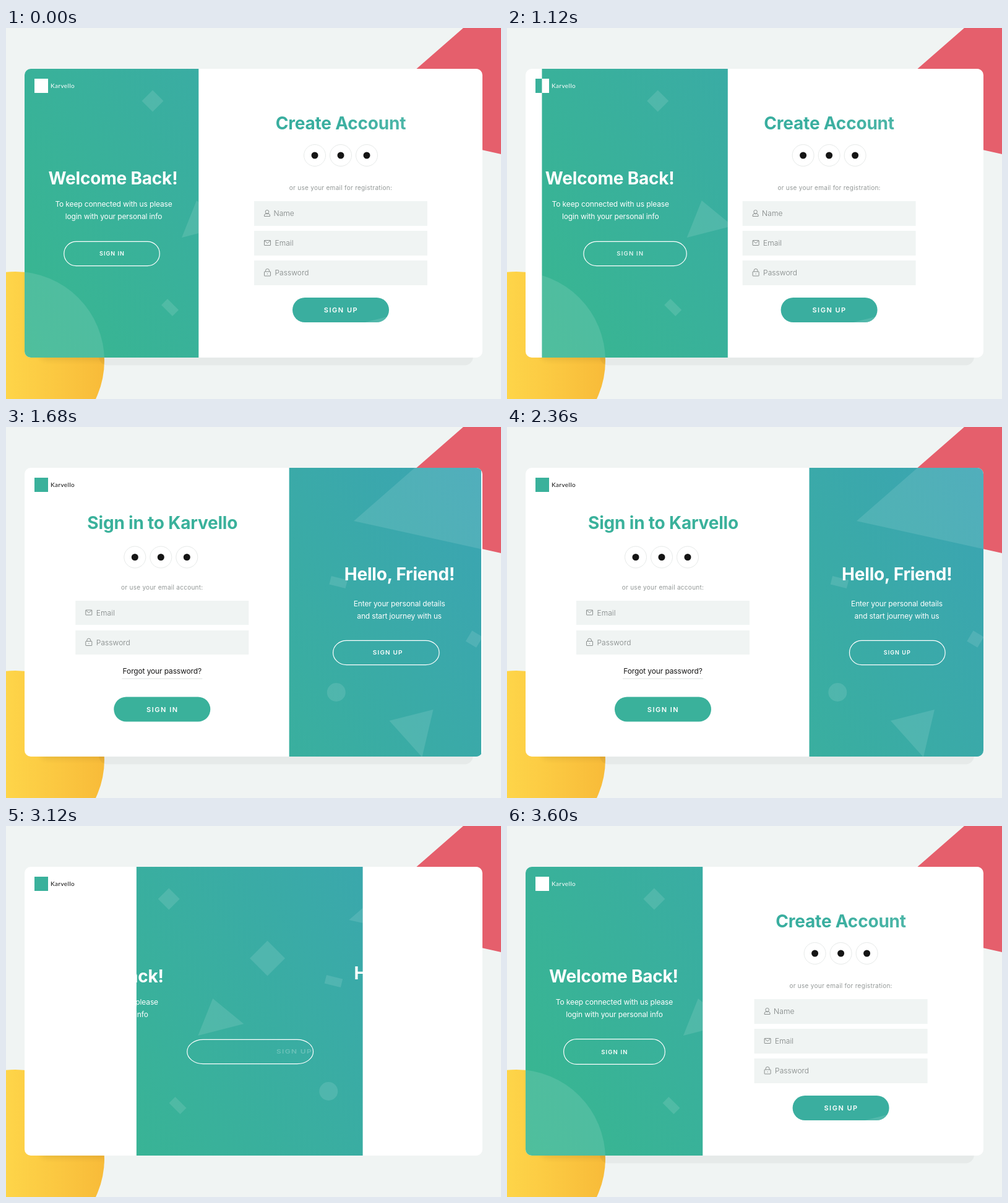
An HTML page that plays this animation: 800 px wide and 600 px high, repeating every 3.64 s.

```html
<!DOCTYPE html>
<html lang="en">
<head>
<meta charset="utf-8">
<title>Sign in / sign up</title>
<style>
html, body { margin: 0; width: 100%; height: 100%; overflow: hidden; background: #f0f4f3; }
svg { display: block; width: 800px; height: 600px; font-family: Inter, "Open Sans", sans-serif; }
text { white-space: pre; }
.title { font-size: 28px; font-weight: 700; letter-spacing: -.2px; text-anchor: middle; }
.body { font-size: 12px; letter-spacing: -.13px; text-anchor: middle; }
.hint { font-size: 10px; letter-spacing: .28px; fill: #939897; text-anchor: middle; }
.label { font-size: 12px; font-weight: 300; letter-spacing: .05px; fill: #7c8180; }
.cta { font-size: 11px; font-weight: 600; letter-spacing: 1.5px; fill: #fff; text-anchor: middle; }
.ghost { font-size: 9px; font-weight: 600; letter-spacing: 1.05px; fill: #fff; text-anchor: middle; }
.brand { font: 10px Lato, sans-serif; letter-spacing: .4px; }
.icon { fill: none; stroke: #8a8f8e; stroke-width: 1; }
</style>
</head>
<body>
<svg viewBox="0 0 800 600">
  <defs>
    <linearGradient id="sea" gradientUnits="userSpaceOnUse" x1="30" y1="533" x2="770" y2="66">
      <stop stop-color="#38b78f"/><stop offset="1" stop-color="#3ba4b3"/>
    </linearGradient>
    <linearGradient id="sun" gradientUnits="userSpaceOnUse" x1="0" y1="0" x2="159" y2="0">
      <stop stop-color="#fed549"/><stop offset="1" stop-color="#f8bb39"/>
    </linearGradient>
    <linearGradient id="heading"><stop offset=".4" stop-color="#39ae9f"/><stop offset="1" stop-color="#4db6a8"/></linearGradient>
    <filter id="soft" x="-10%" y="-50%" width="120%" height="200%"><feGaussianBlur stdDeviation="5"/></filter>
    <clipPath id="card"><rect x="30" y="66" width="740" height="467" rx="10"/></clipPath>
    <clipPath id="window"><rect id="windowRect" y="66" height="467"/></clipPath>
    <clipPath id="sunClip"><circle cx="15" cy="538" r="144"/></clipPath>
  </defs>

  <rect width="800" height="600" fill="#f0f4f3"/>
  <circle cx="15" cy="538" r="144" fill="url(#sun)"/>
  <path d="M739 0H800V204L565 152Z" fill="#e55f6c"/>
  <g clip-path="url(#sunClip)">
    <rect x="55" y="490" width="690" height="47" rx="10" opacity=".08" filter="url(#soft)"/>
  </g>
  <rect id="shadow" x="150" y="500" width="605" height="45.5" rx="14" opacity=".045"/>
  <rect x="30" y="66" width="740" height="467" rx="10" fill="#fff"/>

  <g clip-path="url(#card)">
    <rect x="46" y="82" width="22" height="23" fill="#3ab19b"/>
    <text class="brand" x="72" y="97" fill="#111">Karvello</text>
    <g id="signUpForm"></g>
    <g id="signInForm"></g>
    <g clip-path="url(#window)">
      <rect x="30" y="66" width="740" height="467" fill="url(#sea)"/>
      <g id="shapes" fill="#fff" fill-opacity=".115"></g>
      <rect x="46" y="82" width="22" height="23" fill="#fff"/>
      <text class="brand" x="72" y="97" fill="#fff">Karvello</text>
    </g>
    <g id="welcome" fill="#fff">
      <text class="title" x="173" y="253">Welcome Back!</text>
      <text class="body" x="174" y="289">To keep connected with us please</text>
      <text class="body" x="174" y="309">login with your personal info</text>
    </g>
    <g id="hello" fill="#fff">
      <text class="title" x="630.3" y="248">Hello, Friend!</text>
      <text class="body" x="630" y="290">Enter your personal details</text>
      <text class="body" x="630" y="310">and start journey with us</text>
    </g>
    <g id="button">
      <rect x="-77.3" y="-19.6" width="154.6" height="39.2" rx="19.6" fill="none" stroke="#fff" stroke-width="1.2" vector-effect="non-scaling-stroke"/>
      <text id="inText" class="ghost" y="3.4">SIGN IN</text>
      <text id="upText" class="ghost" y="3.4">SIGN UP</text>
    </g>
  </g>
</svg>
<script>
const LOOP = 3640, STEP = 40, RETURN = 1791;
const $ = id => document.getElementById(id);
const mix = (a, b, k) => a + (b - a) * k;
const ramp = (x, a, b) => Math.min(1, Math.max(0, (x - a) / (b - a)));
const smooth = (x, a, b) => { const k = ramp(x, a, b); return k * k * (3 - 2 * k); };

const icons = {
  Name: '<circle cx="5" cy="3.3" r="2.8"/><path d="M.5 10.5V9Q.8 6.5 3 6.3Q5 7.3 7 6.3Q9.3 6.5 9.5 9V10.5Z"/>',
  Email: '<rect x=".5" y="1.5" width="10" height="8" rx=".5"/><path d="M.8 2L5.5 6L10.2 2"/>',
  Password: '<rect x=".5" y="4" width="10" height="7" rx=".5"/><path d="M2.5 4V2.5Q2.5 -.5 5.5 -.5T8.5 2.5V4M5.5 7V8.3"/>'
};

function field(name, x, y, h) {
  const mid = y + h / 2, textX = x + (name === 'Name' ? 31.5 : 33.5);
  return `<rect x="${x}" y="${y}" width="280" height="${h}" fill="#f0f4f3"/>
    <g class="icon" transform="translate(${x + 16} ${mid - 6})">${icons[name]}</g>
    <text class="label" x="${textX}" y="${mid + 4.2}">${name}</text>`;
}

const socials = (x, y) => [-42, 0, 42].map(dx =>
  `<circle cx="${x + dx}" cy="${y}" r="17.5" fill="#fff" stroke="#e6e9e8"/>
   <circle cx="${x + dx}" cy="${y}" r="5.5" fill="#151515"/>`).join('');

const cta = (label, x, y, fill) =>
  `<rect x="${x - 78}" y="${y}" width="156" height="40" rx="20" fill="${fill}"/>
   <text class="cta" x="${x + .5}" y="${y + 24}">${label}</text>`;

$('signUpForm').innerHTML =
  '<text class="title" x="541" y="164" fill="url(#heading)">Create Account</text>' +
  socials(541, 206) +
  '<text class="hint" x="541" y="262">or use your email for registration:</text>' +
  ['Name', 'Email', 'Password'].map((n, i) => field(n, 401, 280 + 48 * i, 40)).join('') +
  cta('SIGN UP', 541, 436, '#3aae9f') +
  '<path d="M580 476L616 467Q611 475 599 476Z" fill="#fff" opacity=".12"/>';

$('signInForm').innerHTML =
  '<text class="title" x="252.5" y="164.5" fill="#3ab19b">Sign in to Karvello</text>' +
  socials(250, 210.5) +
  '<text class="hint" x="252" y="262.5">or use your email account:</text>' +
  ['Email', 'Password'].map((n, i) => field(n, 112, 281 + 48 * i, 39)).join('') +
  '<text class="body" x="252" y="398.5" fill="#181818">Forgot your password?</text>' +
  '<path d="M187 407H317" stroke="#dde1e0"/>' +
  cta('SIGN IN', 252, 436.5, '#3ab19b');

// Each shape has its own drift: p is 0 with the panel at left, 1 at right.
const fromLeft = reach => p => reach * p ** .75;
const toRight = reach => p => -reach * (1 - p) ** 1.2;
const shapes = [
  ['<circle cx="15" cy="538" r="144"/>', fromLeft(0)],
  ['<path d="M237 100.5L254.5 118L237 135.5L219.5 118Z"/>', fromLeft(45)],
  ['<path d="M308 279L358 320L284 339Z"/>', fromLeft(45)],
  ['<path d="M261 438L279 456L269 466L251 448Z"/>', fromLeft(21.5)],
  ['<path d="M412 185.5L440.5 214L412 242.5L383.5 214Z"/>', fromLeft(18)],
  ['<rect x="524" y="244" width="27" height="14" transform="rotate(14 537.5 251)"/>', toRight(18)],
  ['<circle cx="534.3" cy="429" r="15"/>', toRight(29)],
  ['<path d="M620 475L691 457L673 534Z"/>', toRight(28)],
  ['<rect x="747" y="333" width="20" height="20" transform="rotate(31 757 343)"/>', toRight(20)],
  ['<path d="M565 152L739 0H1000V248Z"/>', p => -15 * Math.sqrt(1 - p)]
];
$('shapes').innerHTML = shapes.map(s => `<g>${s[0]}</g>`).join('');
const shapeNodes = [...$('shapes').children];

// Quick start joined to a long power-curve settle.
function glide(t, end, span) {
  const u = (end - t) / span, joint = .8357;
  if (u <= 0) return 1;
  if (u < joint) return 1 - u ** 2.4;
  return .35 * Math.max(0, 1 - (u - joint) / .4687) ** 2.5;
}
const lead = t => glide(t, 1743, 610);
const trail = t => glide(t, 1922, 745);

const shift = (node, x) => node.setAttribute('transform', `translate(${x.toFixed(2)} 0)`);

function draw(t) {
  const back = t > 2400, clock = back ? t - RETURN : t;
  const a = lead(clock), b = trail(clock);
  const left = mix(30, 488.5, back ? 1 - a : b);
  const right = mix(311.3, 770, back ? 1 - b : a);
  const p = back ? 1 - (a + b) / 2 : (a + b) / 2, q = 1 - p;
  const width = right - left;

  $('windowRect').setAttribute('x', left);
  $('windowRect').setAttribute('width', width);
  shapeNodes.forEach((node, i) => shift(node, shapes[i][1](p)));

  shift($('signUpForm'), -260 * p);
  $('signUpForm').style.display = p < .5 ? '' : 'none';
  shift($('signInForm'), 640 * q ** 2.3);
  $('signInForm').style.display = p > .48 ? '' : 'none';

  shift($('welcome'), -24.3 * (1 - q ** 4));
  $('welcome').style.opacity = 1 - ramp(p, .65, .85);
  shift($('hello'), 30 * Math.sqrt(q));
  $('hello').style.opacity = ramp(p, .12, .4);

  const hover = smooth(t, 480, 760) - smooth(t, 960, 1160)
    + smooth(t, 2400, 2600) - smooth(t, 2740, 2940) + smooth(t, 3300, 3540);
  const grow = 1 + .04 * hover;
  const stretch = (155 + (width - 281.4) * .585) / 155 * grow;
  $('button').setAttribute('transform',
    `translate(${mix(171, 630.8, p)} 365) scale(${stretch} ${grow})`);
  const slide = k => 147 * k * k / (k + .03) / stretch;
  $('inText').setAttribute('x', .5 - slide(p));
  $('inText').style.opacity = 1 - ramp(p, 0, .45);
  $('upText').setAttribute('x', slide(q));
  $('upText').style.opacity = ramp(p, .33, .95);

  $('shadow').style.display = Math.abs(p - .5) > .4 ? '' : 'none';
}

function tick(now) {
  const t = now % LOOP;
  draw(t < 400 ? 0 : Math.floor(t / STEP) * STEP);
  requestAnimationFrame(tick);
}
draw(0);
requestAnimationFrame(tick);
</script>
</body>
</html>
```
